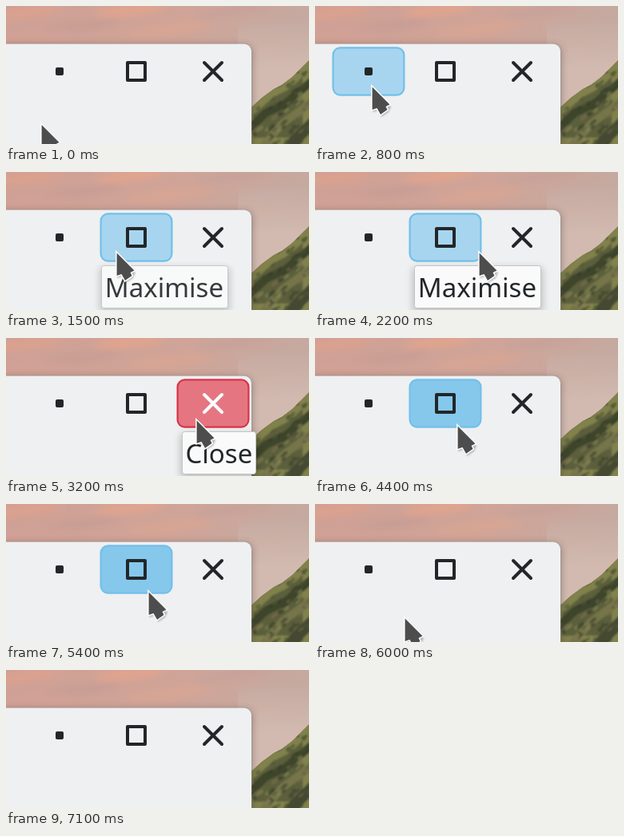
These frames come from a looping animation (379 by 173 pixels, 7.5 s). An HTML page:

```html
<!DOCTYPE html>
<html lang="en">
<head>
<meta charset="utf-8">
<title>Window buttons</title>
<style>
html, body { margin: 0; width: 100%; height: 100%; overflow: hidden; }
svg { display: block; }
text { font: 33px "Noto Sans", "Open Sans", sans-serif; fill: #232629; }
.tip rect { fill: #fafafa; stroke: #c3c4c5; }
.tip .shade { fill: #000; stroke: none; opacity: .2; filter: url(#soft); }
.icon { fill: none; stroke: #232629; stroke-width: 4; stroke-linejoin: round; stroke-linecap: round; }
.hover { fill: #a7d5ef; stroke: #72c0ea; stroke-width: 2.2; }
</style>
</head>
<body>
<svg width="379" height="173" viewBox="0 0 379 173">
  <defs>
    <linearGradient id="sky" x2="1" y2=".3">
      <stop offset="0" stop-color="#cfa095"/>
      <stop offset=".55" stop-color="#d0a498"/>
      <stop offset="1" stop-color="#c3aaa1"/>
    </linearGradient>
    <linearGradient id="haze" x2="0" y2="1">
      <stop offset=".1" stop-color="#d2bab0" stop-opacity="0"/>
      <stop offset=".45" stop-color="#d2bab0"/>
    </linearGradient>
    <filter id="soft" x="-30%" y="-100%" width="160%" height="300%"><feGaussianBlur stdDeviation="5"/></filter>
    <filter id="rough" x="-30%" y="-30%" width="160%" height="160%"><feGaussianBlur stdDeviation="1.2"/></filter>
    <clipPath id="slope"><path id="ridge" d="M300 131 308 126 320 115 335 104 345 99 358 89 370 77 380 67V174H300Z"/></clipPath>
  </defs>

  <rect width="379" height="173" fill="url(#sky)"/>
  <g id="clouds" filter="url(#soft)"></g>
  <rect x="290" width="89" height="173" fill="url(#haze)"/>
  <g clip-path="url(#slope)">
    <use href="#ridge" fill="#5c5f3c"/>
    <g filter="url(#rough)" fill="none">
      <use href="#ridge" stroke="#80814c" stroke-width="18"/>
      <path d="M300 158 325 134 350 122 385 92" stroke="#3d442c" stroke-width="10"/>
      <path d="M318 180 345 148 385 118" stroke="#75744a" stroke-width="10"/>
      <path d="M345 185 385 145" stroke="#444a30" stroke-width="14"/>
      <g id="shrubs" opacity=".6"></g>
    </g>
  </g>

  <rect x="-20" y="49" width="328" height="150" rx="9" fill="#3a2d2d" opacity=".4" filter="url(#soft)"/>
  <rect x="-20" y="47.5" width="327" height="150" rx="9" fill="#eff0f1" stroke="#858b90" stroke-opacity=".6" paint-order="stroke"/>

  <rect class="hover" id="minHover" x="22.6" y="52.4" width="88.8" height="59.2" rx="9"/>
  <rect class="hover" id="maxHover" x="118.6" y="52.4" width="88.8" height="59.2" rx="9"/>
  <rect class="hover" id="closeHover" x="214.6" y="52.4" width="88.8" height="59.2" rx="9" style="fill:#e57681;stroke:#da3349"/>
  <rect x="62" y="77" width="10" height="10" rx="2" fill="#232629"/>
  <rect class="icon" x="152" y="71" width="22" height="22"/>
  <path class="icon" id="cross" d="M248 71l22 22m0-22-22 22"/>

  <g class="tip" id="maxTip">
    <rect class="shade" x="122" y="120" width="163" height="56"/>
    <rect x="124.5" y="117.5" width="158" height="53" rx="3"/>
    <text x="128.8" y="157">Maximise</text>
  </g>
  <g class="tip" id="closeTip">
    <rect class="shade" x="218" y="120" width="97" height="56"/>
    <rect x="220.5" y="117.5" width="92" height="53" rx="3"/>
    <text x="224.5" y="157">Close</text>
  </g>

  <g id="cursor">
    <path d="M2 5V35L9 33 13 41 22 35 25 28Z" fill="#000" opacity=".25" filter="url(#rough)"/>
    <path d="M1.600 3.600V32L7.500 30 12 38 20.500 32 18.500 28 23.500 25.500Z" fill="#4d4d4d" stroke="#fff" stroke-width="3" paint-order="stroke"/>
  </g>
</svg>
<script>
const $ = id => document.getElementById(id);
const LOOP = 7500, STEP = 100;

function ellipse(parent, cx, cy, rx, ry, fill, angle = 0) {
  const e = document.createElementNS("http://www.w3.org/2000/svg", "ellipse");
  Object.entries({cx, cy, rx, ry, fill, transform: `rotate(${angle} ${cx} ${cy})`})
    .forEach(([key, value]) => e.setAttribute(key, value));
  parent.append(e);
}

[[25, 8, 45, 6, "#dda18d"], [95, 25, 50, 6, "#c79d94"], [155, 5, 45, 6, "#e3a48c"],
 [205, 29, 55, 6, "#d8a593"], [30, 38, 50, 5, "#d2a196"], [285, 6, 50, 6, "#c7a299"],
 [335, 28, 45, 8, "#c5aaa2"]].forEach(c => ellipse($("clouds"), ...c, -7));

let seed = 11;
const random = () => (seed = seed * 16807 % 2147483647) / 2147483647;
const shades = ["#383e28", "#868653", "#4d5634", "#7a6d50", "#353b2a"];
for (let i = 0; i < 90; i++)
  ellipse($("shrubs"), 305 + random() * 74, 70 + random() * 105,
    2 + random() * 4, 1 + random() * 2, shades[i % 5], -40);

// Linear interpolation through [time, value] points.
function track(t, ...points) {
  let [a, va] = points[0];
  for (const [b, vb] of points) {
    if (t < b) return va + (vb - va) * Math.max(0, (t - a) / (b - a));
    [a, va] = [b, vb];
  }
  return va;
}
const pulse = (t, from, on, hold, off) => track(t, [from, 0], [on, 1], [hold, 1], [off, 0]);
const mix = (a, b, k) => `rgb(${a.map((v, i) => v + (b[i] - v) * k)})`;

function draw(now) {
  const t = Math.floor(now % LOOP / STEP) * STEP;
  const x = track(t, [0, 43], [400, 55], [800, 70], [900, 70], [1200, 95], [1500, 137],
    [1700, 162], [1800, 162], [2200, 204], [2400, 237], [3200, 237], [3400, 208],
    [3700, 177], [5400, 177], [6000, 111], [6800, 111], [7000, 43]);
  const y = track(t, [0, 145.5], [400, 110], [800, 98], [2200, 98], [2400, 100],
    [3200, 100], [3700, 100], [3900, 107], [5400, 107], [6000, 140], [6800, 140],
    [7000, 156], [7100, 180]);
  $("cursor").setAttribute("transform", `translate(${x} ${y})`);

  const close = pulse(t, 2200, 2400, 3300, 3600);
  $("minHover").style.opacity = pulse(t, 300, 600, 1100, 1400);
  $("maxHover").style.opacity = t < 3000 ? pulse(t, 1200, 1500, 2200, 2400) : pulse(t, 3300, 3600, 5500, 5900);
  $("maxHover").style.fill = t < 4400 ? "#a7d5ef" : "#85c8ec";
  $("closeHover").style.opacity = close;
  $("cross").style.stroke = mix([35, 38, 41], [255, 255, 255], close);

  $("maxTip").style.opacity = track(t, [1400, 0], [1500, .9], [1700, 1], [2200, 1], [2400, 0]);
  $("maxTip").setAttribute("transform", `translate(${track(t, [1400, -7], [1500, -5], [1700, 0])})`);
  $("closeTip").style.opacity = t < 3000 ? track(t, [2700, 0], [2900, 1])
    : track(t, [3500, 1], [3700, .45], [3900, 0]);
}

const start = performance.now();
function frame() {
  draw(performance.now() - start);
  requestAnimationFrame(frame);
}
frame();
</script>
</body>
</html>
```
